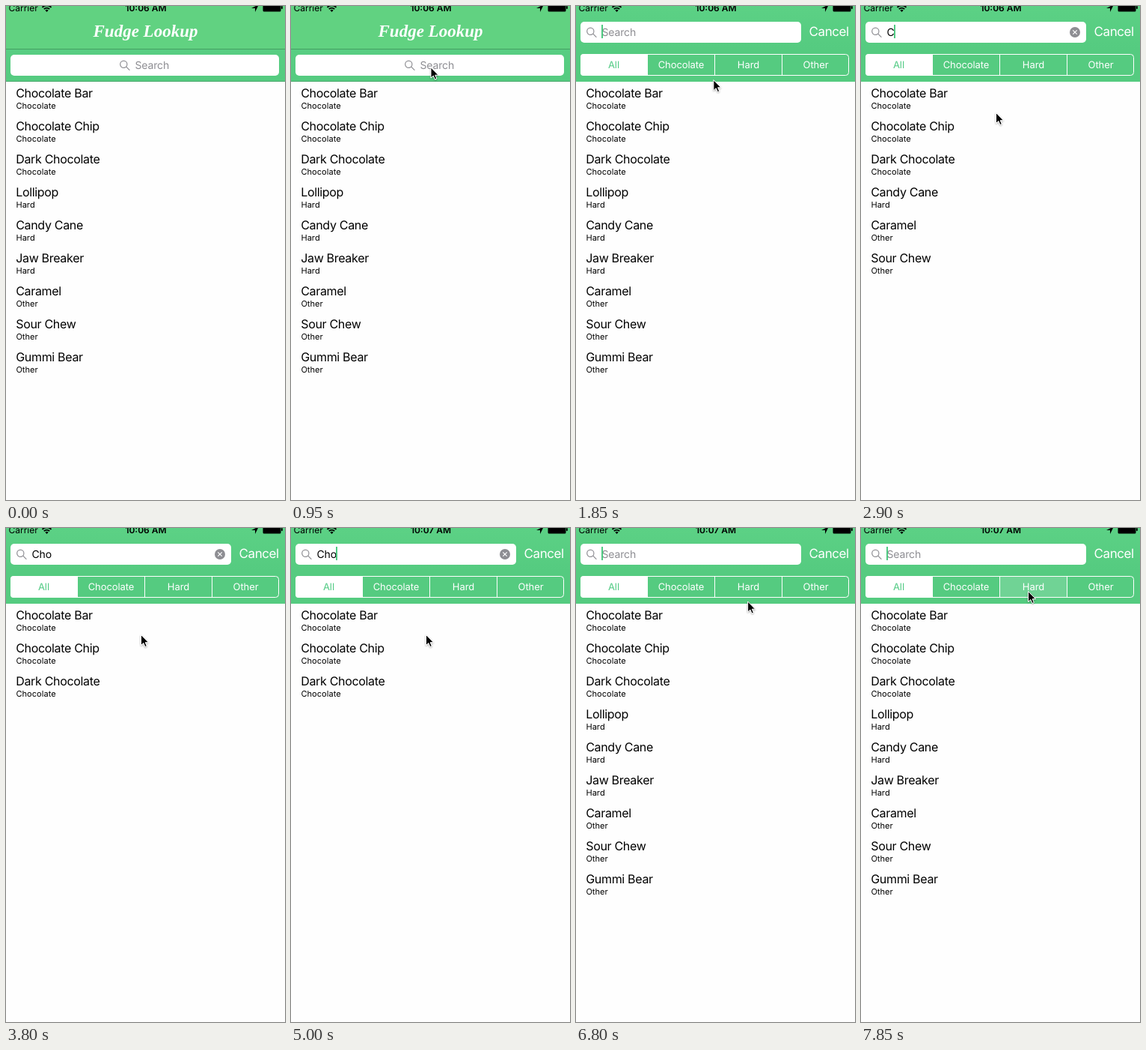
Animation of 373 by 659 pixels, one loop 8 s. Source, as an HTML page:

```html
<!DOCTYPE html>
<html lang="en">
<head>
<meta charset="utf-8">
<title>Sweets list</title>
<style>
  html, body { margin: 0; width: 100%; height: 100%; overflow: hidden; background: #fefefe; }
  svg { display: block; width: 373px; height: 659px; }
  text {
    font-family: Inter, "Liberation Sans", sans-serif;
    text-rendering: geometricPrecision;
    white-space: pre;
  }
  .name { font-size: 16px; letter-spacing: -.32px; }
  .kind { font-size: 11px; letter-spacing: .06px; }
  .status { font-size: 12px; }
  .time { font-weight: 600; text-anchor: middle; }
  .title { font: italic 700 23px "Liberation Serif", "Noto Serif", serif; fill: #fff; text-anchor: middle; }
  .field { font-size: 14px; letter-spacing: -.15px; }
  .hint { fill: #8e8e93; }
  .cancel { font-size: 17px; letter-spacing: -.41px; fill: #fff; }
  .seg { font-size: 13px; letter-spacing: -.08px; fill: #fff; text-anchor: middle; }
  .seg.on { fill: #4fca82; }
</style>
</head>
<body>
<svg viewBox="0 0 373 659">
  <defs>
    <linearGradient id="green" x2="0" y2="1">
      <stop stop-color="#5cd185"/>
      <stop offset="1" stop-color="#55cb80"/>
    </linearGradient>
    <clipPath id="head"><rect width="373" height="101"/></clipPath>
    <filter id="soft" x="-50%" y="-50%" width="200%" height="200%">
      <feDropShadow dx="0" dy="1" stdDeviation=".8" flood-opacity=".35"/>
    </filter>
  </defs>
  <rect width="373" height="659" fill="#fefefe"/>
  <g id="list"></g>

  <g clip-path="url(#head)">
    <g id="scope">
      <rect width="373" height="44" fill="#55cb80"/>
      <rect x="6" y="7" width="90" height="29" rx="4" fill="#fff"/>
      <rect x="90" y="7" width="6" height="29" fill="#fff"/>
      <rect id="press" x="186" y="8" width="89" height="27" fill="#fff" opacity=".16"/>
      <rect x="6.5" y="7.5" width="358" height="28" rx="4" fill="none" stroke="#fff"/>
      <path d="M95.5 7V36M185.5 7V36M275.5 7V36" stroke="#fff"/>
      <g id="segs"></g>
    </g>
    <rect id="bar" width="373" fill="url(#green)"/>
    <rect id="edge" y="100" width="373" height="1" fill="#4aa86c"/>
    <g id="nav">
      <rect width="373" height="58" fill="#61d281"/>
      <rect y="57" width="373" height="1" fill="#469f62"/>
      <text class="title" x="186.5" y="41">Fudge Lookup</text>
    </g>
    <g id="search">
      <rect id="box" x="6" width="359" height="28" rx="5" fill="#fff"/>
      <g id="lens">
        <g fill="none" stroke="#8e8e93" stroke-width="1.2" stroke-linecap="round">
          <circle cx="5.3" cy="12.8" r="4.6"/>
          <path d="M8.8 16.2L13 20.4"/>
        </g>
        <text id="hint" class="field hint" x="20.5" y="19">Search</text>
      </g>
      <text id="typed" class="field" x="34.5" y="19"></text>
      <rect id="caret" y="4" width="2" height="18" fill="#4fca82"/>
      <g id="clear">
        <circle cx="286" cy="14" r="7" fill="#8e8e93"/>
        <path d="M283.3 11.3l5.4 5.4M288.7 11.3l-5.4 5.4" stroke="#fff" stroke-width="1.2"/>
      </g>
      <text id="cancel" class="cancel" y="19">Cancel</text>
    </g>
  </g>

  <text class="status" x="3.5" y="7">Carrier</text>
  <path d="M48.5 1.8A8.5 8.5 0 0 1 60.5 1.8M50.8 4.2A5.2 5.2 0 0 1 58.2 4.2"
    fill="none" stroke="#000" stroke-width="1.7"/>
  <path d="M54.5 8L52.4 5.8A3 3 0 0 1 56.6 5.8Z"/>
  <text id="time" class="status time" x="187" y="7"></text>
  <path d="M338-2L328 3H333V8Z"/>
  <rect x="343.5" y="-2" width="24" height="9.5" rx="1.5"/>
  <rect x="368" y="0" width="1.8" height="4" rx=".8"/>

  <path id="pointer" d="M0 0V14L3.3 11L5.5 16L7.8 15L5.7 10.2H10Z"
    stroke="#fff" stroke-width="1" filter="url(#soft)"/>
</svg>

<script>
const $ = id => document.getElementById(id);
const LOOP = 8000, STEP = 150, FIRST = 500;
const OPEN = 1175, TYPE = 2900, ERASE = 5000, MINUTE = 4550, PRESS = 7700;
const WORD = "Cho";

const sweets = [
  ["Chocolate", "Chocolate Bar", "Chocolate Chip", "Dark Chocolate"],
  ["Hard", "Lollipop", "Candy Cane", "Jaw Breaker"],
  ["Other", "Caramel", "Sour Chew", "Gummi Bear"]
].flatMap(([kind, ...names]) => names.map(name => ({ name, kind })));

// Turning points of the pointer: time, x, y.
const route = [
  [500, 287, 137], [950, 187, 82], [1700, 185, 84], [2300, 180.5, 142.5],
  [5750, 180.5, 142.5], [5900, 177.5, 144.5], [6250, 186, 151], [6700, 231, 101], [7250, 223.5, 84.5]
];

const clamp = (v, lo = 0, hi = 1) => Math.min(hi, Math.max(lo, v));
const smooth = u => u * u * (3 - 2 * u);
const set = (id, attrs) => {
  for (const key in attrs) $(id).setAttribute(key, attrs[key]);
};
const move = (id, x, y) => set(id, { transform: `translate(${x} ${y})` });

function pointerAt(t) {
  const i = clamp(route.findLastIndex(p => p[0] <= t), 0, route.length - 2);
  const [a, ax, ay] = route[i], [b, bx, by] = route[i + 1];
  const u = clamp((t - a) / (b - a));
  return [ax + (bx - ax) * u, ay + (by - ay) * u];
}

// Two letters per step going in, one per step coming out.
function typedAt(t) {
  const n = Math.min(1 + 2 * (t - TYPE) / STEP, WORD.length - (t - ERASE) / STEP);
  return WORD.slice(0, clamp(n, 0, WORD.length));
}

// The caret stays lit after each input, then pulses.
function caretAt(t) {
  const wake = [1550, 3050, 5450, PRESS].findLast(w => w <= t);
  if (!wake) return 0;
  const idle = t - wake;
  return idle < 450 ? 1 : clamp(.5 - 1.5 * Math.cos(2 * Math.PI * (idle - 825) / 840));
}

function addText(parent, cls, x, y, content) {
  const el = document.createElementNS("http://www.w3.org/2000/svg", "text");
  el.setAttribute("class", cls);
  el.setAttribute("x", x);
  el.setAttribute("y", y);
  el.textContent = content;
  parent.append(el);
}

["All", "Chocolate", "Hard", "Other"].forEach((label, i) =>
  addText($("segs"), i ? "seg" : "seg on", 50.5 + 90 * i, 26, label));

let query = null;
function filter(text) {
  if (text === query) return;
  query = text;
  $("typed").textContent = text;
  $("list").replaceChildren();
  sweets
    .filter(s => s.name.toLowerCase().includes(text.toLowerCase()))
    .forEach(({ name, kind }, i) => {
      addText($("list"), "name", 13.2, 122 + 44 * i, name);
      addText($("list"), "kind", 13.4, 137 + 44 * i, kind);
    });
}

function draw(ms) {
  const t = ms < FIRST ? 0 : FIRST + Math.floor((ms - FIRST) / STEP) * STEP;
  const p = smooth(clamp((t - OPEN) / 300));
  const bottom = 101 - 44 * p;

  filter(typedAt(t));
  move("nav", 0, -64 * p);
  move("search", 0, 65 - 44 * p);
  move("scope", 0, bottom);
  move("lens", 152 - 138 * p ** .69, 0);
  move("pointer", ...pointerAt(t));

  set("scope", { opacity: p });
  set("bar", { height: bottom });
  set("edge", { opacity: p ? 0 : 1 });
  set("box", { width: 359 - 64 * p });
  set("cancel", { x: 311.5 + 66 * (1 - p), opacity: p });
  set("hint", { opacity: query ? 0 : 1 });
  set("clear", { opacity: query ? 1 : 0 });
  set("caret", {
    x: 34 + (query ? Math.round($("typed").getComputedTextLength()) : 0),
    opacity: caretAt(t)
  });
  set("pointer", { opacity: t < FIRST ? 0 : 1 });
  set("press", { visibility: t < PRESS ? "hidden" : "visible" });
  $("time").textContent = t < MINUTE ? "10:06 AM" : "10:07 AM";
}

const start = performance.now();
function tick() {
  draw((performance.now() - start) % LOOP);
  requestAnimationFrame(tick);
}
tick();
</script>
</body>
</html>
```
